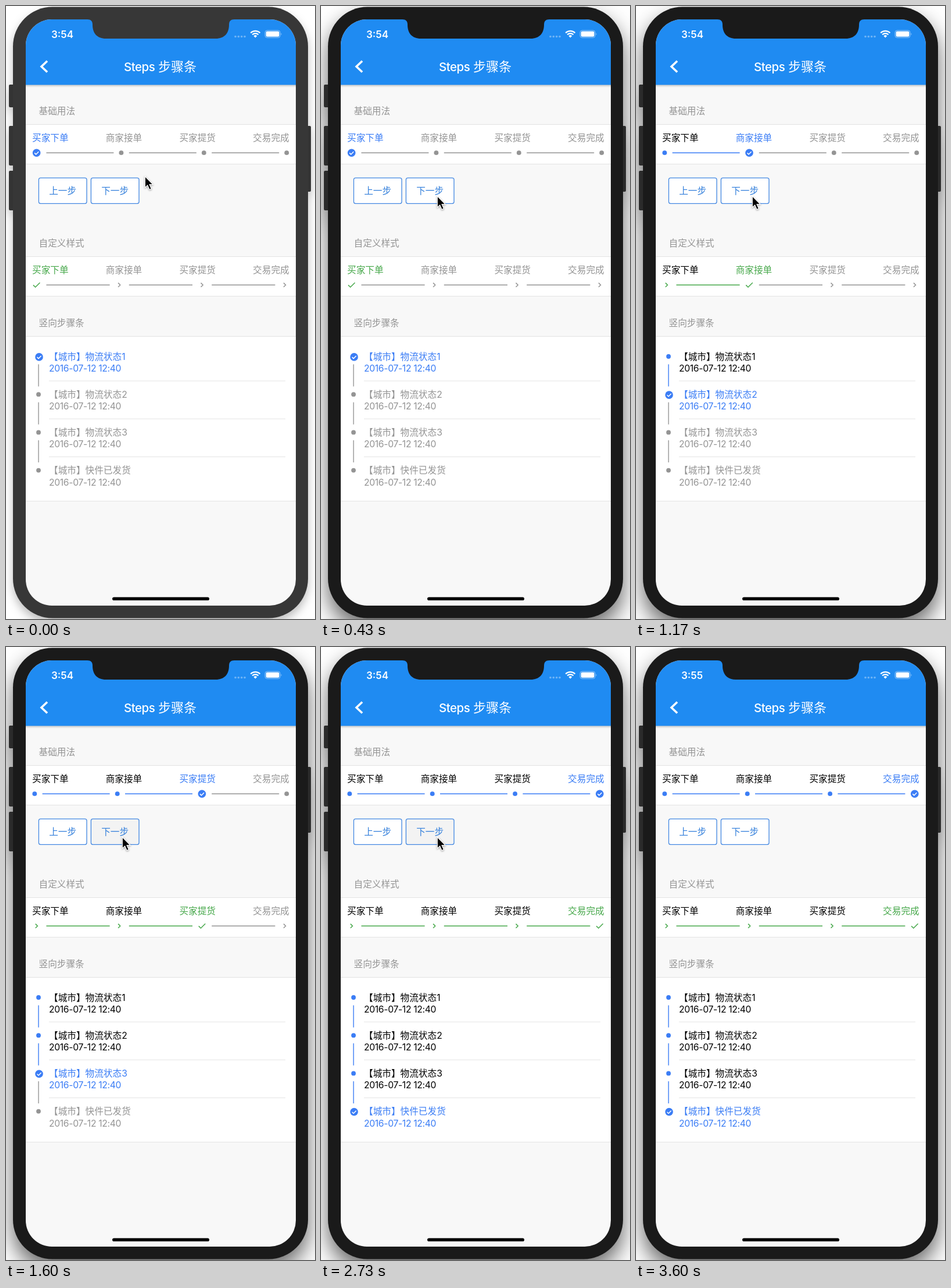
An HTML page that plays this animation: 532x1053 px, repeating every 3630 ms.

```html
<!DOCTYPE html>
<html lang="zh-CN">
<head>
<meta charset="utf-8">
<title>Steps</title>
<style>
  html, body { margin: 0; width: 100%; height: 100%; overflow: hidden; background: #fff; }
  svg { display: block; width: 532px; height: 1053px; }
  text { font: 15.65px Inter, "Noto Sans CJK SC", "Noto Sans CJK", sans-serif; text-spacing-trim: space-all; }
  .date { letter-spacing: -.3px; }
  #phone { fill: #373737; filter: drop-shadow(0 8px 8px #0004); }
  #phone .key { fill: #343434; }
  #phone.active { fill: #1a1a1a; filter: drop-shadow(0 18px 18px #0009); }
  #phone.active .key { fill: #2b2b2b; }
  #notch { fill: #373737; }
  .active ~ #notch { fill: #1a1a1a; }
</style>
</head>
<body>
<svg viewBox="0 0 532 1053">
  <defs>
    <clipPath id="screen"><rect x="34" y="23" width="465" height="1007" rx="45"/></clipPath>
    <linearGradient id="shade" x2="0" y2="1">
      <stop stop-color="#000" stop-opacity=".2"/><stop offset="1" stop-color="#000" stop-opacity="0"/>
    </linearGradient>
  </defs>
  <g id="phone">
    <g class="key">
      <rect x="5" y="135" width="10" height="39" rx="2"/>
      <rect x="5" y="206" width="10" height="68" rx="2"/>
      <rect x="5" y="283" width="10" height="68" rx="2"/>
      <rect x="516" y="206" width="9" height="113" rx="2"/>
    </g>
    <rect x="12" y="1.5" width="508" height="1050" rx="68"/>
  </g>
  <g clip-path="url(#screen)">
    <rect x="34" y="23" width="465" height="1007" fill="#f8f8f8"/>
    <rect x="34" y="135" width="465" height="5" fill="url(#shade)"/>
    <rect x="34" y="23" width="465" height="112.5" fill="#1f8bf2"/>
    <g id="page"></g>
  </g>
  <path id="notch" d="M140 22V23C146 23 149 26 149 32C149 47 157 56 172 56H361C376 56 384 47 384 32C384 26 387 23 393 23V22Z"/>
  <g fill="#fff">
    <text id="clock" x="78" y="54.5" style="font-size:17px;font-weight:600">3:54</text>
    <g opacity=".35">
      <circle cx="395" cy="52.5" r="1.8"/><circle cx="400.3" cy="52.5" r="1.8"/>
      <circle cx="405.7" cy="52.5" r="1.8"/><circle cx="411" cy="52.5" r="1.8"/>
    </g>
    <path d="M429.3 54.5L426.4 51.4A4.1 4.1 0 0 1 432.2 51.4Z"/>
    <g fill="none" stroke="#fff" stroke-width="2.3">
      <path d="M424.1 49.2A7.4 7.4 0 0 1 434.5 49.2M421.2 46.2A11.5 11.5 0 0 1 437.4 46.2"/>
    </g>
    <rect x="446" y="42" width="26" height="12.4" rx="3.6" fill="none" stroke="#fff" stroke-opacity=".5"/>
    <rect x="447.6" y="43.6" width="22.8" height="9.2" rx="2.2"/>
    <path d="M473.5 46.2Q475.5 48.2 473.5 50.2Z" opacity=".5"/>
    <path d="M71 94.5L61 104L71 113.5" fill="none" stroke="#fff" stroke-width="3.6"/>
    <text x="203" y="111.5" style="font-size:20.5px;font-weight:500;letter-spacing:-.5px">Steps</text>
    <text x="262" y="112" style="font-size:22px;font-weight:500">步骤条</text>
  </g>
  <rect x="183" y="1015.5" width="167" height="5.6" rx="2.8"/>
  <path id="cursor" d="M0 0V19.5L4.4 15.4L7.7 23L11 21.6L7.8 14.2H13.8Z" stroke="#fff" stroke-width="1.2"
    style="filter:drop-shadow(0 1px 1.5px #0006)"/>
</svg>
<script>
const LOOP = 3630, BLUE = '#3b7df5', GREEN = '#47a84b', GRAY = '#949494';
const CLICKS = [800, 1560, 2620];
const LABELS = ['买家下单', '商家接单', '买家提货', '交易完成'];
const EVENTS = ['物流状态1', '物流状态2', '物流状态3', '快件已发货'];
const el = id => document.getElementById(id);

const label = (x, y, s, fill, more = '') => `<text x="${x}" y="${y + 5.8}" fill="${fill}" ${more}>${s}</text>`;
const line = (x1, y1, x2, y2, color, width = 1.4) =>
  `<path d="M${x1} ${y1}L${x2} ${y2}" stroke="${color}" stroke-width="${width}"/>`;
const dot = (x, y, color) => `<circle cx="${x}" cy="${y}" r="3.9" fill="${color}"/>`;
const mark = (x, y, d, color) =>
  `<path transform="translate(${x} ${y})" d="${d}" fill="none" stroke="${color}" stroke-width="1.5"/>`;
const badge = (x, y) => `<circle cx="${x}" cy="${y}" r="6.8" fill="${BLUE}"/>` +
  mark(x, y, 'M-3.5 .2L-1 2.7L3.6 -2', '#fff');
const panel = (top, bottom) => `<rect x="33" y="${top}" width="467" height="${bottom - top}" fill="#fff" stroke="#e3e3e3"/>`;
const button = (x, s, fill) =>
  `<rect x="${x}" y="295.3" width="82.6" height="44" rx="3" fill="${fill}" stroke="#4388e2" stroke-width="1.3"/>` +
  label(x + 41.3, 317.5, s, '#337fdb', 'text-anchor="middle"');

function page(step, pressed) {
  const tone = (i, now, past = '#000') => i < step ? past : i === step ? now : GRAY;
  let out = label(56.5, 180.5, '基础用法', GRAY) + label(56.5, 407.5, '自定义样式', GRAY) +
    label(56.5, 544.5, '竖向步骤条', GRAY) +
    panel(203.5, 271.5) + panel(430.5, 498.5) + panel(567.5, 850.5) +
    button(56.4, '上一步', '#fff') + button(146.4, '下一步', pressed ? '#f3f3f3' : '#fff');

  for (let i = 0; i < 4; i++) {
    const x = 142.4 * i, y = 65.2 * i, done = i < step, now = i === step;
    const blue = done ? BLUE : GRAY, green = done ? GREEN : GRAY;
    const labelX = 45 + 126.7 * i;

    out += label(labelX, 226.5, LABELS[i], tone(i, BLUE)) + label(labelX, 453.5, LABELS[i], tone(i, GREEN));
    out += now ? badge(52.6 + x, 252.2) : dot((done ? 49.3 : 56) + x, 252.2, blue);
    out += now ? mark(52.6 + x, 479.2, 'M-5.7 .2L-2 3.8L5.8 -4', GREEN)
               : mark(52.6 + x, 479.2, 'M-1.9 -3.6L1.7 0L-1.9 3.6', green);
    out += now ? badge(57, 602.9 + y) : dot(56, 602 + y, blue);
    out += label(74, 602 + y, '【城市】' + EVENTS[i], tone(i, BLUE)) +
      label(74, 622.2 + y, '2016-07-12 12:40', tone(i, BLUE), 'class="date"');

    if (i < 3) {
      const start = (done ? 62.6 : 69.4) + x;
      out += line(start, 252.2, start + 116, 252.2, blue) +
        line(69.4 + x, 479.2, 178.6 + x, 479.2, green) +
        line(56, 615.5 + y, 56, 653.5 + y, blue) +
        line(74, 644 + y, 481, 644 + y, '#e4e4e4', 1);
    }
  }
  return out;
}

let shown = '';
function draw(t) {
  const step = CLICKS.filter(c => t >= c).length;
  const pressed = CLICKS.some(c => t >= c - 80 && t < c + 150);
  const key = step + '/' + pressed;
  if (key !== shown) {
    el('page').innerHTML = page(step, pressed);
    shown = key;
  }
  el('phone').classList.toggle('active', t >= 430);
  el('clock').textContent = t < 3200 ? '3:54' : '3:55';

  const p = Math.min(1, Math.max(0, (t - 30) / 330)), ease = p * p * (3 - 2 * p);
  el('cursor').setAttribute('transform', `translate(${239.3 - 39 * ease} ${292.5 + 34 * ease})`);
  el('cursor').style.display = t < 3560 ? '' : 'none';
}

const begin = performance.now();
function tick() {
  draw((performance.now() - begin) % LOOP);
  requestAnimationFrame(tick);
}
tick();
</script>
</body>
</html>
```
